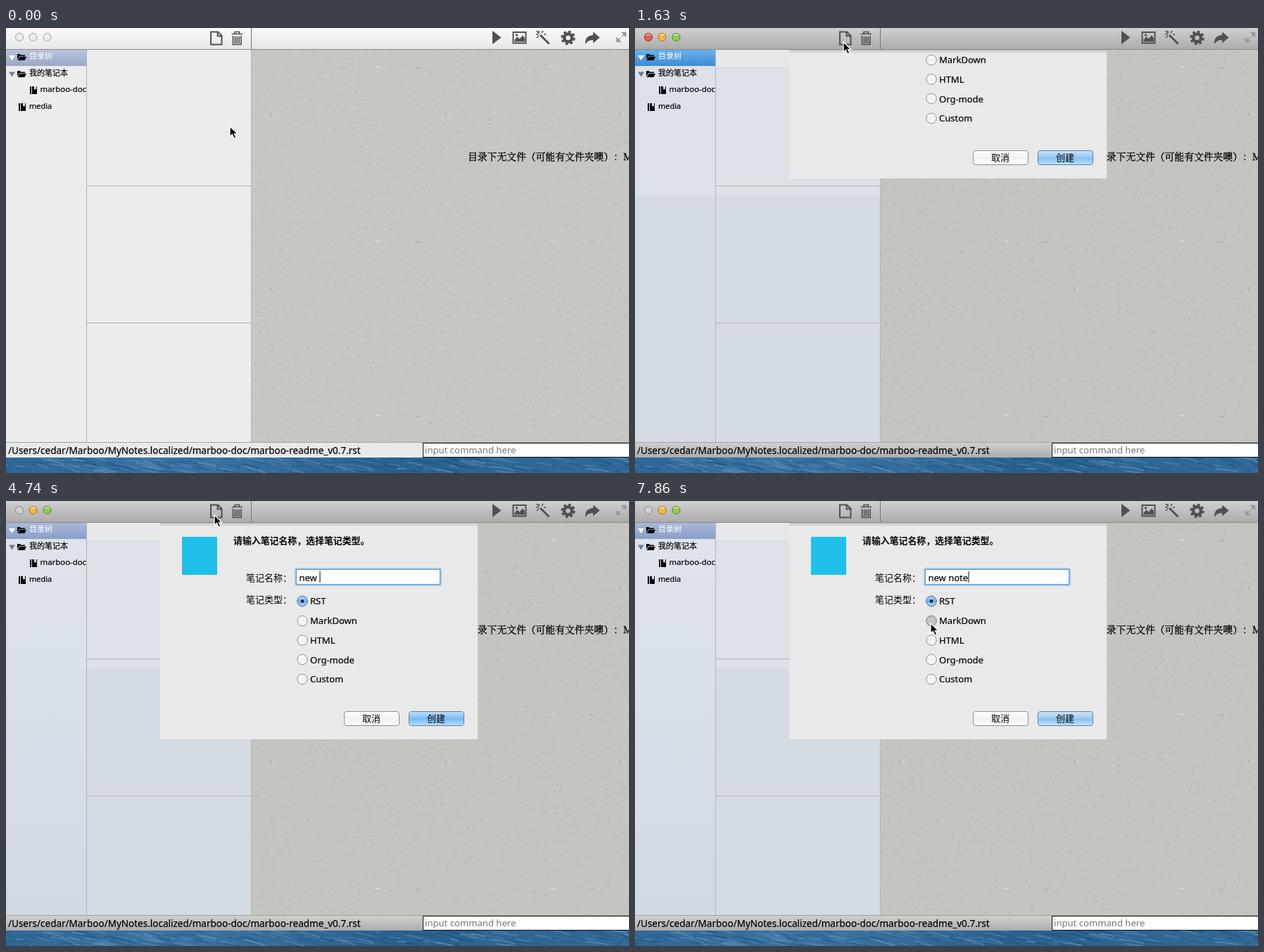
Recreate the animation shown at these times as an HTML page with a canvas. Size 885 by 633 pixels, loop 8000 ms.

```html
<!DOCTYPE html>
<html lang="zh-CN">
<head>
<meta charset="utf-8">
<title>New note dialog</title>
<style>
html, body { margin: 0; width: 100%; height: 100%; overflow: hidden; }
#stage { position: relative; width: 885px; height: 633px; overflow: hidden; background: #ececec; }
#paper { position: absolute; left: 349px; top: 31px; background: #c8c6c1; }
svg { display: block; }
#stage > svg { position: absolute; left: 0; top: 0; }
text { font: 13px "Noto Sans", "Noto Sans CJK SC", sans-serif; white-space: pre; stroke: #000; stroke-width: .2px; }
.side { font-size: 11px; }
.path { font-size: 13.5px; }
.bold { font-weight: 700; }
.serif { font: 13.8px "Noto Serif CJK SC", "Noto Serif", "Noto Sans CJK SC", serif; text-spacing-trim: space-all; stroke-width: .3px; }
.mid { text-anchor: middle; }
.soft { stroke: none; }

/* every track shares one 8 s loop with hard steps */
#paper, .active, .key, .press, .sheet, .slide, .typing, .caret, .flat, .hover, .cursor {
  animation: 8s step-end infinite;
}
#paper { animation-name: tint; }
.active { animation-name: active; }
.key { animation-name: key; }
.press { animation-name: press; }
.sheet { animation-name: active; }
.slide { animation-name: slide; }
.typing { animation-name: typing; }
.caret { animation-name: blink; }
.flat { animation-name: flat; }
.hover { animation-name: hover; }
.cursor { animation-name: cursor; }
.pulse { animation: pulse 1s ease-in-out infinite alternate; }

@keyframes tint { 0% { background: #c8c6c1; } 18.4%, 100% { background: #c4c5be; } }
@keyframes active { 0% { visibility: hidden; } 18.4%, 100% { visibility: visible; } }
@keyframes key { 0% { visibility: hidden; } 18.4% { visibility: visible; } 27.6%, 100% { visibility: hidden; } }
@keyframes press { 0% { visibility: hidden; } 18.4% { visibility: visible; } 20.2%, 100% { visibility: hidden; } }
@keyframes slide {
  0% { transform: translateY(-288px); }
  20.2% { transform: translateY(-125px); }
  22%, 100% { transform: none; }
}
@keyframes typing {
  0% { transform: none; }
  40.5% { transform: translateX(8px); }
  46.1% { transform: translateX(15.4px); }
  49.7% { transform: translateX(25.6px); }
  55.4% { transform: translateX(29px); }
  61% { transform: translateX(37px); }
  62.9% { transform: translateX(44.9px); }
  64.7% { transform: translateX(49.6px); }
  66.6%, 100% { transform: translateX(56.9px); }
}
@keyframes blink {
  0% { opacity: 1; }
  33.1% { opacity: 0; }
  40.5% { opacity: 1; }
  72.1% { opacity: 0; }
  77.7% { opacity: 1; }
  85.1% { opacity: 0; }
  92.5%, 100% { opacity: 1; }
}
@keyframes pulse { from { opacity: .1; } to { opacity: .75; } }
@keyframes flat { 0% { opacity: 0; } 35% { opacity: 1; } 46.1%, 100% { opacity: 0; } }
@keyframes hover { 0% { opacity: 0; } 98.1%, 100% { opacity: 1; } }
@keyframes cursor {
  0% { transform: translate(318px, 140px); }
  7.4% { transform: translate(317px, 130px); }
  9.2% { transform: translate(312px, 93px); }
  11% { transform: translate(303px, 51px); }
  12.9% { transform: translate(297px, 26px); }
  14.7% { transform: translate(296px, 20px); }
  85.1% { transform: translate(308px, 22px); }
  86.9% { transform: translate(338px, 36px); }
  88.7% { transform: translate(364px, 70px); }
  90.6% { transform: translate(387px, 109px); }
  92.5% { transform: translate(405px, 144px); }
  94.3% { transform: translate(415px, 164px); }
  96.2% { transform: translate(420px, 172px); }
  98.1%, 100% { transform: translate(420px, 174px); }
}
</style>
</head>
<body>
<div id="stage">
<canvas id="paper" width="536" height="559"></canvas>
<svg width="885" height="633" viewBox="0 0 885 633">
  <defs>
    <linearGradient id="barIdle" x2="0" y2="1"><stop stop-color="#fafafa"/><stop offset="1" stop-color="#e7e7e7"/></linearGradient>
    <linearGradient id="barOn" x2="0" y2="1"><stop stop-color="#d0d0d0"/><stop offset="1" stop-color="#acacac"/></linearGradient>
    <linearGradient id="rowIdle" x2="0" y2="1"><stop stop-color="#b9c3db"/><stop offset="1" stop-color="#9ba8c9"/></linearGradient>
    <linearGradient id="rowKey" x2="0" y2="1"><stop stop-color="#6cb2e8"/><stop offset="1" stop-color="#3d8bd6"/></linearGradient>
    <linearGradient id="rowOn" x2="0" y2="1"><stop stop-color="#a9b9d9"/><stop offset="1" stop-color="#899fc9"/></linearGradient>
    <linearGradient id="sideOn" x2="0" y2="1"><stop stop-color="#dfe4eb"/><stop offset="1" stop-color="#d1d9e2"/></linearGradient>
    <linearGradient id="knob" x2="0" y2="1"><stop stop-color="#fff"/><stop offset=".5" stop-color="#f1f1f1"/><stop offset="1" stop-color="#fcfcfc"/></linearGradient>
    <linearGradient id="blue" x2="0" y2="1"><stop stop-color="#d3e7fa"/><stop offset=".48" stop-color="#a4cff4"/><stop offset=".52" stop-color="#8fc3f1"/><stop offset="1" stop-color="#c2e6fc"/></linearGradient>
    <linearGradient id="deep" x2="0" y2="1"><stop stop-color="#b5d7f8"/><stop offset=".5" stop-color="#6fb2f0"/><stop offset="1" stop-color="#a9dcfc"/></linearGradient>
    <linearGradient id="fade" x2="0" y2="1"><stop stop-color="#b9b9c4"/><stop offset="1" stop-color="#e9e9e9" stop-opacity="0"/></linearGradient>
    <linearGradient id="sea" x2="1" y2="0"><stop stop-color="#2f6796"/><stop offset=".3" stop-color="#3b73a2"/><stop offset=".6" stop-color="#2b618f"/><stop offset="1" stop-color="#326a98"/></linearGradient>
    <clipPath id="typed"><rect class="typing" x="317" y="98" width="100" height="21"/></clipPath>
    <clipPath id="sideClip"><rect y="30" width="114" height="560"/></clipPath>
    <clipPath id="seaClip"><rect y="611" width="885" height="22"/></clipPath>
    <g id="folder"><path d="M0 9V1h4l1 1.500h6V4H3z"/><path d="M3.500 4.800H13L10.500 10H.8z"/></g>
    <path id="book" d="M0 0h2v11H0zM3 0h3v5l1.500-1.500L9 5V0h1v11H3z"/>
    <g id="radio"><circle r="7.200" fill="url(#knob)" stroke="#8c8c8c"/><circle class="flat" r="6.700" fill="#e8e8e8"/></g>
  </defs>

  <!-- side columns -->
  <rect y="30" width="348" height="560" fill="#ececec"/>
  <g class="active">
    <rect y="30" width="114" height="560" fill="url(#sideOn)"/>
    <rect x="114" y="30" width="234" height="208" fill="#dce1e8"/>
    <rect x="114" y="238" width="234" height="352" fill="#d4dbe3"/>
    <rect x="114" y="30" width="234" height="25" fill="#e8e8ea"/>
  </g>
  <g class="key">
    <rect y="54" width="114" height="184" fill="#dce1e9"/>
    <rect y="238" width="114" height="352" fill="#d4dbe3"/>
  </g>
  <rect y="31" width="114" height="23" fill="url(#rowIdle)"/>
  <rect class="active" y="31" width="114" height="23" fill="url(#rowOn)"/>
  <rect class="key" y="31" width="114" height="23" fill="url(#rowKey)"/>
  <path d="M114.500 30V590M348.500 30V590M115 224.500H348M115 419.500H348" stroke="#b4b5b6"/>
  <path d="M4 39h9l-4.500 7z" fill="#fff"/>
  <path d="M4 62.500h9l-4.500 7z" fill="#6f7f8f"/>
  <use href="#folder" x="16" y="36"/>
  <use href="#folder" x="16" y="60"/>
  <use href="#book" x="34" y="83"/>
  <use href="#book" x="18" y="107"/>
  <g clip-path="url(#sideClip)">
    <text class="side soft" x="33" y="44" fill="#fff">目录树</text>
    <text class="side" x="33" y="67.500">我的笔记本</text>
    <text class="side" x="48.500" y="91" style="font-size:11.4px">marboo-doc</text>
    <text class="side" x="33" y="115">media</text>
  </g>
  <text class="serif" x="656" y="188">目录下无文件（可能有文件夹噢）：M</text>

  <!-- dialog sheet -->
  <svg x="219" y="31" width="452" height="309" viewBox="219 31 452 309" class="sheet">
    <g class="slide">
      <rect x="219" y="31" width="451" height="308" fill="#e9e9e9"/>
      <rect x="250" y="51" width="50" height="54" fill="#1fc0ea"/>
      <text class="bold soft" x="323" y="60.500" style="font-size:12.9px">请输入笔记名称，选择笔记类型。</text>
      <text class="soft" x="341" y="113.500">笔记名称：</text>
      <text class="soft" x="341" y="144.500">笔记类型：</text>
      <rect x="411.500" y="96.500" width="206" height="23" rx="2" fill="#fff" stroke="#a3c8ea" stroke-width="3"/>
      <rect x="412.500" y="97.500" width="204" height="21" fill="none" stroke="#5b95cc"/>
      <rect class="flat" x="413.500" y="98.500" width="202" height="19" fill="#e8e8e8"/>
      <text x="416.500" y="113.500" clip-path="url(#typed)">new note</text>
      <g class="caret"><rect class="typing" x="416.500" y="100" width="1" height="16"/></g>
      <use href="#radio" x="421" y="142.500"/>
      <circle cx="421" cy="142.500" r="7.200" fill="url(#deep)" stroke="#5878a5"/>
      <circle cx="421" cy="142.500" r="2.300" fill="#0d1b33"/>
      <use href="#radio" x="421" y="170.500"/>
      <circle class="hover" cx="421" cy="170.500" r="7.200" fill="#c6c6c6" stroke="#858585"/>
      <use href="#radio" x="421" y="198"/>
      <use href="#radio" x="421" y="225.500"/>
      <use href="#radio" x="421" y="253.500"/>
      <text x="432" y="147">RST</text>
      <text x="432" y="175">MarkDown</text>
      <text x="432" y="203">HTML</text>
      <text x="432" y="230.500">Org-mode</text>
      <text x="432" y="258">Custom</text>
      <rect x="480.500" y="299.500" width="78" height="20" rx="3.500" fill="url(#knob)" stroke="#8f8f8f"/>
      <rect class="flat" x="481.500" y="300.500" width="76" height="18" rx="3" fill="#e9e9e9"/>
      <rect x="572.500" y="299.500" width="78" height="20" rx="3.500" fill="url(#blue)" stroke="#5f7fa5"/>
      <rect class="pulse" x="573" y="300" width="77" height="19" rx="3" fill="url(#deep)"/>
      <text class="mid soft" x="519" y="314">取消</text>
      <text class="mid soft" x="611" y="314">创建</text>
    </g>
    <rect x="219" y="31" width="451" height="7" fill="url(#fade)"/>
  </svg>

  <!-- title bar -->
  <rect width="885" height="30" fill="url(#barIdle)"/>
  <rect class="active" width="885" height="30" fill="url(#barOn)"/>
  <path d="M0 30.500H885" stroke="#8a8a8a"/>
  <path d="M348.500 0V30" stroke="#747474"/>
  <g fill="#ececec" stroke="#a2a2a2">
    <circle cx="19" cy="13" r="5.500"/><circle cx="38.500" cy="13" r="5.500"/><circle cx="58.500" cy="13" r="5.500"/>
  </g>
  <g class="active">
    <circle cx="19" cy="13" r="5.500" fill="#cfcfcf" stroke="#8d8d8d"/>
    <circle cx="38.500" cy="13" r="5.500" fill="#f5b83d" stroke="#a87520"/>
    <circle cx="58.500" cy="13" r="5.500" fill="#8fcb52" stroke="#558c2d"/>
    <path d="M35.500 10.500q3-2.500 6 0M55.500 10.500q3-2.500 6 0" fill="none" stroke="#fff" stroke-opacity=".7" stroke-width="1.500"/>
  </g>
  <g class="key">
    <circle cx="19" cy="13" r="5.500" fill="#ee5a50" stroke="#a13630"/>
    <path d="M16 10.500q3-2.500 6 0" fill="none" stroke="#fff" stroke-opacity=".7" stroke-width="1.500"/>
  </g>
  <path class="press" d="M291 5.500h10l5.500 5.500v12.500H291z" fill="#eee" stroke="#f4f4f4" stroke-width="6" stroke-linejoin="round"/>
  <g fill="none" stroke="#505050" stroke-width="2">
    <path d="M291 5.500h10l5.500 5.500v12.500H291zM300.500 6v5.500h6"/>
    <path d="M320.500 8.500h15.500M325 8V5.500h6.500V8M322.500 11v12.500h11.500V11M325.500 12v10M328.300 12v10M331.200 12v10" stroke-width="1.700"/>
    <path d="M720.500 6h18v15.500h-18z"/>
    <path d="M759 10l12.500 12.500" stroke-width="3"/>
    <path d="M757 4v4M753 9h4M763 4l-2 3M753.500 4l2.500 2.500M754 14l3-3M764 9h3" stroke-width="1.500"/>
    <circle cx="798.500" cy="14" r="5.500" stroke-width="4.500"/>
    <circle cx="798.500" cy="14" r="8.700" stroke-width="3" stroke-dasharray="3.700 3.133"/>
  </g>
  <g fill="#505050">
    <path d="M691 4l12.500 9.500L691 23z"/>
    <path d="M722.500 19.500v-3l4-4 3 3 4.500-5 3 4v5z"/><circle cx="725.500" cy="10" r="1.700"/>
    <path d="M834 5.500l9.500 8-9.500 8V17q-8 0-11 6-1-12 11-13z"/>
  </g>
  <path d="M875 6.500h5.500V12zM867.500 14v5.500h5.500zM879 8l-4 4M869 18l4-4" fill="#999" stroke="#999" stroke-width="1.300"/>

  <!-- status bar and desktop -->
  <rect y="590" width="592" height="21" fill="#e9e9e9"/>
  <rect class="active" y="590" width="592" height="21" fill="url(#barOn)"/>
  <path d="M0 589.500H885" stroke="#a2a2a2"/>
  <rect x="592.500" y="590.500" width="296" height="20" fill="#fff" stroke="#111"/>
  <text class="path" x="3" y="605.500">/Users/cedar/Marboo/MyNotes.localized/marboo-doc/marboo-readme_v0.7.rst</text>
  <text class="soft" x="595" y="604.500" fill="#757575" style="font-size:13.1px">input command here</text>
  <rect y="611" width="885" height="22" fill="url(#sea)"/>
  <g id="waves" fill="none" clip-path="url(#seaClip)"></g>

  <g class="cursor">
    <path d="M0 0V14.500l3.400-3.200 2.600 5.700 2.800-1.200-2.500-5.500h4.500z" stroke="#fff" stroke-width="1.300"/>
  </g>
</svg>
</div>
<script>
let seed = 7;
const rnd = (a = 0, b = 1) => {
  seed = (seed * 16807) % 2147483647;
  return a + (b - a) * seed / 2147483647;
};

function paper() {
  const size = 248;
  const tile = document.createElement('canvas');
  tile.width = tile.height = size;
  const c = tile.getContext('2d');
  const dash = (x, y, len, rise, color) => {
    c.strokeStyle = color;
    c.beginPath();
    c.moveTo(x, y);
    c.lineTo(x + len, y + rise);
    c.stroke();
  };
  for (let i = 0; i < 2600; i++) {
    const ink = rnd() < .5 ? '70,70,62' : '240,239,232';
    dash(rnd(0, size), rnd(0, size), rnd(1, 3.5), rnd(-1, 1), `rgba(${ink},${rnd(.02, .1)})`);
  }
  for (let i = 0; i < 50; i++) {
    dash(rnd(0, size), rnd(0, size), rnd(2, 5), rnd(-2, 2), 'rgba(90,90,82,.15)');
  }
  dash(176, 25, 6, -1, '#e8e8e2');
  dash(232, 25, 7, 1, 'rgba(90,90,82,.3)');
  dash(26, 89, 3, 6, 'rgba(90,90,82,.3)');
  dash(30, 94, 4, -4, 'rgba(240,240,235,.6)');
  const ctx = document.getElementById('paper').getContext('2d');
  ctx.fillStyle = ctx.createPattern(tile, 'repeat');
  ctx.fillRect(0, 0, 536, 559);
}

function waves() {
  const colors = ['#174a76', '#5c8fb8', '#1e5685', '#7ba5c4'];
  let out = '';
  for (let i = 0; i < 180; i++) {
    const x = rnd(-30, 880), y = rnd(608, 632), w = rnd(10, 36);
    out += `<path d="M${x} ${y}q${w / 2} 1 ${w} ${w * rnd(.1, .3)}" stroke="${colors[i % 4]}" stroke-width="${rnd(1, 2.5)}" opacity=".45"/>`;
  }
  document.getElementById('waves').innerHTML = out;
}

paper();
waves();
</script>
</body>
</html>
```
